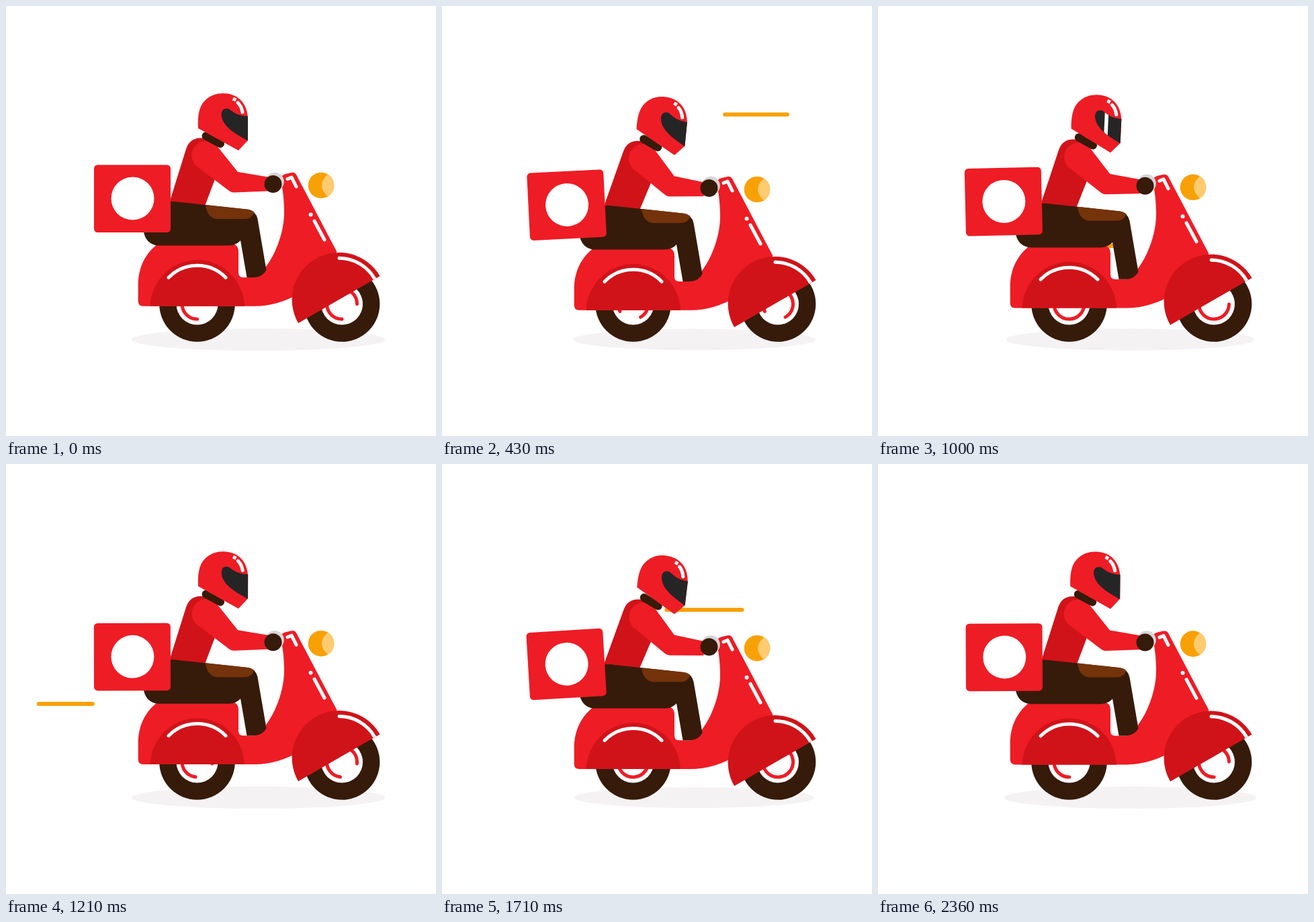
Animation of 640x640 px, one loop 2.43 s. Source, as an HTML page:

```html
<!DOCTYPE html>
<html lang="en">
<head>
<meta charset="utf-8">
<title>Scooter delivery</title>
<style>
  html, body { margin: 0; width: 100%; height: 100%; overflow: hidden; background: #fff; }
  svg { display: block; width: 100vw; height: 100vh; }
  .red { fill: #ee1c25; }
  .deep { fill: #d01319; }
  .brown { fill: #361b0a; }
  .amber { fill: #f8a106; }
  .white { fill: #fff; }
  .shine { fill: none; stroke: #fff; stroke-width: 5; stroke-linecap: round; stroke-linejoin: round; }
  .spin { fill: none; stroke: #ee1c25; stroke-width: 5; stroke-linecap: round; }
</style>
</head>
<body>
<svg viewBox="0 0 640 640">
  <defs>
    <clipPath id="visorClip">
      <path id="visor" d="M320.5 161Q321 151 331 153C338 157 342 163 360 164V200.5C347 193 321 181 320.5 161Z"/>
    </clipPath>
    <g id="wheel">
      <circle class="brown" r="56.3"/>
      <circle class="white" r="31"/>
    </g>
    <path id="ring" class="spin" d="M0 22.5A22.5 22.5 0 1 1 22.5 0"/>
  </defs>

  <ellipse id="shadow" cx="375.5" cy="496.5" fill="#f4f2f3"/>
  <g id="lines" class="amber"></g>

  <g transform="translate(284.5 443.5)"><use href="#wheel"/><use href="#ring" class="turn"/></g>
  <g transform="translate(500 443.5)"><use href="#wheel"/><use href="#ring" class="turn"/></g>

  <g id="ride">
    <circle class="amber" cx="469" cy="267" r="19.3"/>
    <path fill="#fecb70" d="M479 250.5A19.3 19.3 0 0 1 479 283.5Q461 267 479 250.5Z"/>

    <path class="red" d="M204 446.8Q196.7 446.8 196.7 439V416C196.7 387 209 367 226 354H338Q346 356 346 366V397Q346 404 353 404H370C392 392 414 345 414 308C414 290 412 270 408 256Q410 252 416 250L425 248Q430 247 432.5 252L492.5 366L440 426Q405 446.8 370 446.8Z"/>
    <path class="deep" d="M214.5 446.8A70.3 71.5 0 0 1 355 446.8Z"/>
    <path class="shine" d="M242 404.2A59.5 59.5 0 0 1 327 404.2"/>
    <path class="deep" d="M435 472A70 70 0 0 1 556.5 402Z"/>
    <path class="shine" style="stroke-linecap:butt" d="M496 375.2A61.5 61.5 0 0 1 548.8 406.2"/>
    <circle class="white" cx="496" cy="375.2" r="2.5"/>
    <path class="shine" d="M419 257.5L425 255L432 269M459 320L474 348"/>
    <circle class="white" cx="453.5" cy="310.5" r="3"/>
    <circle cx="400" cy="261.5" r="13.8" fill="#d8d6d7"/>

    <g id="torso">
      <path class="deep" d="M238 309L268 213Q273 197 289 196.5H302L325 225L312 255L291 311Z"/>
      <path class="red" d="M313 207L345 247L390 254.5V275.5L340 277.5Q336 278 332 275L283 238A21.5 21.5 0 0 1 313 207Z"/>
      <path d="M297.5 193.5L319 205" fill="none" stroke="#361b0a" stroke-width="12" stroke-linecap="round"/>
    </g>

    <path class="brown" d="M205 335C206 348 216 356.6 228 356.6H332Q343 356 349 349L358.5 404H370Q382 403 387.5 393L374.5 317Q372 305 360 302.7L297 296L250 291H240L205 330Z"/>
    <path fill="#74330a" d="M297 296L360 302.7Q366 303.5 369.5 307Q366 317 355 317H314Q299 315 297 296Z"/>
    <circle class="brown" cx="397.5" cy="265" r="13"/>

    <g id="head">
      <path class="red" d="M286 182C285 165 287 150 295 142C303 133 313 130 323 130C344 130 358 143 360 165V200L346 215Z"/>
      <use href="#visor" fill="#262526"/>
      <g clip-path="url(#visorClip)"><rect id="glint" class="white" y="140" width="5.5" height="70"/></g>
      <rect class="white" x="-2.5" y="-2.5" width="5" height="5" transform="translate(340 139) rotate(25)"/>
      <path class="shine" d="M345 144Q350.5 149 352 158"/>
    </g>

    <g id="box">
      <rect class="red" x="131" y="236.5" width="114" height="100.5" rx="5.5"/>
      <circle class="white" cx="188.5" cy="286.5" r="32"/>
    </g>
  </g>
</svg>

<script>
const LOOP = 2430, FPS = 14, LAST = 33;
const BOUNCE = 16.8;   // steps in one down-and-up bounce
const TURN = 33.6;     // steps in two wheel turns
const RUN = 9.9, LAG = 1.68;

// Speed lines: height, right end, left end, first step
const STREAKS = [
  [161.6, 620, 14, 0.72],
  [357, 616, 46, 6.3],
  [217, 620, 14, 17.52]
];

const $ = id => document.getElementById(id);
const clamp = v => Math.min(1, Math.max(0, v));
const smooth = u => u * u * (3 - 2 * u);
const move = (id, value) => $(id).setAttribute('transform', value);
const rings = document.querySelectorAll('.turn');

const bars = STREAKS.map(([y]) => {
  const bar = document.createElementNS('http://www.w3.org/2000/svg', 'rect');
  bar.setAttribute('y', y - 3);
  bar.setAttribute('height', 6);
  bar.setAttribute('rx', 2.3);
  $('lines').append(bar);
  return bar;
});

function drawStreaks(step) {
  STREAKS.forEach(([, right, left, start], n) => {
    const at = s => right + (left - right) * Math.pow(clamp((s - start) / RUN), 1.75);
    const front = at(step), back = at(step - LAG);
    bars[n].setAttribute('x', front);
    bars[n].setAttribute('width', back - front);
  });
}

function draw(step) {
  const phase = (step % BOUNCE) / (BOUNCE / 2);
  const dip = phase < 1 ? phase : 2 - phase;
  const angle = 720 * smooth(clamp(step / TURN));

  move('ride', `translate(0 ${8.4 * dip})`);
  move('torso', `rotate(${3 * dip} 340 264)`);
  move('head', `rotate(${8 * dip} 335 215)`);
  move('box', `rotate(${-4 * dip} 256 337)`);

  const squash = 1 - 0.065 * dip;
  $('shadow').setAttribute('rx', 189 * squash);
  $('shadow').setAttribute('ry', 16.5 * squash);

  rings.forEach(r => r.setAttribute('transform', `rotate(${angle})`));
  $('glint').setAttribute('x', 335 + (step - 14) * 10);
  drawStreaks(step);
}

const begin = performance.now();
function tick() {
  const t = (performance.now() - begin) % LOOP;
  draw(Math.min(LAST, Math.floor((t + 5) * FPS / 1000)));
  requestAnimationFrame(tick);
}
tick();
</script>
</body>
</html>
```
